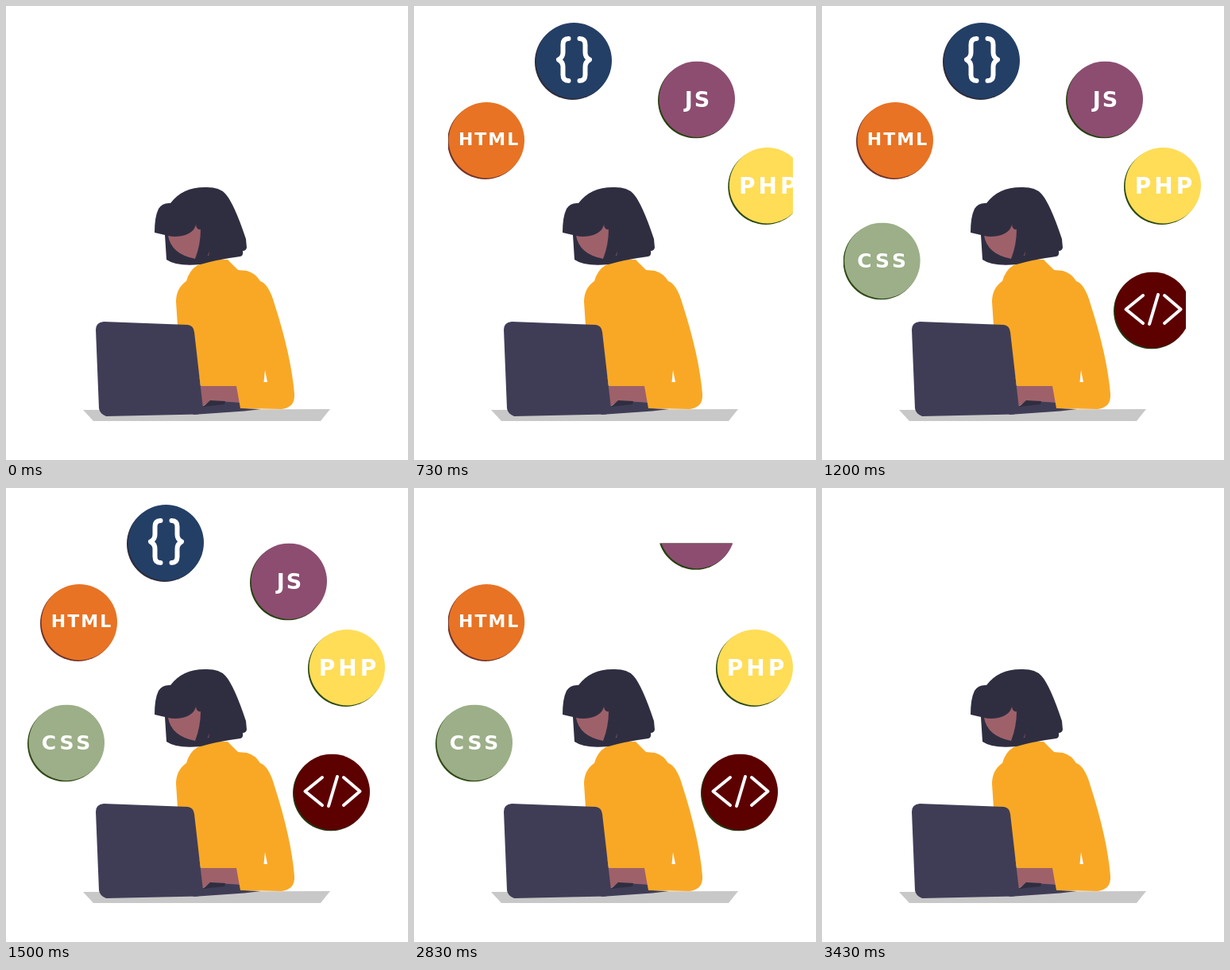
An HTML page with a canvas for the animation above (3.53 s loop, 506 by 571 pixels).

```html
<!DOCTYPE html>
<html lang="en">
<head>
<meta charset="utf-8">
<title>Coder at work</title>
<style>
  html, body { margin: 0; width: 100%; height: 100%; overflow: hidden; background: #fff; }
  canvas { display: block; }
</style>
</head>
<body>
<canvas id="stage" width="506" height="571"></canvas>
<script>
const ctx = document.getElementById('stage').getContext('2d');
const LOOP = 3530;
const BOX = 97;
const ENTER = { stagger: 200, duration: 500 };
const LEAVE = { firstEnd: 2704, stagger: 143, duration: 225 };
const HAIR = '#2f2e41', SKIN = '#9e616a', SHIRT = '#f9a826', LAPTOP = '#3f3d56';

function label(text, x, y, size, spacing) {
  return () => {
    ctx.font = `bold ${size}px "DejaVu Sans", sans-serif`;
    ctx.letterSpacing = spacing + 'px';
    ctx.textAlign = 'center';
    ctx.fillStyle = '#fff';
    ctx.fillText(text, x + spacing / 2, y + size * 0.365);
  };
}

function strokes(x, y, width, d) {
  const path = new Path2D(d);
  return () => {
    ctx.translate(x, y);
    ctx.lineWidth = width;
    ctx.lineCap = ctx.lineJoin = 'round';
    ctx.strokeStyle = '#fff';
    ctx.stroke(path);
  };
}

const braces = strokes(49.5, 46.5, 6,
  'M-7-26.5Q-14-26.5-14-19V-9Q-14-3-19.5 0Q-14 3-14 9V19Q-14 26.5-7 26.5' +
  'M7-26.5Q14-26.5 14-19V-9Q14-3 19.5 0Q14 3 14 9V19Q14 26.5 7 26.5');
const tag = strokes(50, 47, 4, 'M-13-17.5L-34.5 0L-13 17.5M6-18.5L-5 18.5M14-17.5L34.5 0L14 17.5');

// dx, dy: the side from which each coin slides into its box
const coins = [
  { x: 152, y: 21, dx: 0, dy: -1, face: '#243f66', edge: '#2d2a39', mark: braces },
  { x: 307, y: 69.5, dx: 0, dy: -1, face: '#8c4d71', edge: '#26400f', mark: label('JS', 49.5, 47.5, 27, 2) },
  { x: 43, y: 121, dx: -1, dy: 0, face: '#e87324', edge: '#70322a', mark: label('HTML', 51.5, 46, 22, 2) },
  { x: 380, y: 178, dx: 1, dy: 0, face: '#ffdd57', edge: '#2b4812', mark: label('PHP', 50, 48, 28, 4) },
  { x: 27, y: 272.5, dx: -1, dy: 0, face: '#9caf88', edge: '#2d4814', mark: label('CSS', 48.5, 47, 25, 4) },
  { x: 361, y: 334.5, dx: 1, dy: 0, face: '#5c0000', edge: '#26330c', mark: tag }
];

const figure = [
  ['#c8c8c8', 'M97 508L408 507L396 522H110Z'],
  [LAPTOP, 'M235 514L247 503L276 497L296 498L300 506L321 507L300 509.5Z'],
  [SKIN, 'M243 477H292L295 499L276 497.5L257 497L247 504Z'],
  [HAIR, 'M248 504L257 496L276 497L275 501Z'],
  [SHIRT, 'M241 326Q231 332 227 346Q214 355 214 372L216 402L236 420L245 478H290L295 506L347 507' +
    'Q364 505 363 488Q359 440 338 375Q331 350 320 346Q314 336 303 333L292 332L279 319L262 319Z'],
  ['#fff', 'M326 458L324.5 473H329Z'],
  [HAIR, 'M207 248Q222 228 250 228Q268 227 276 236Q287 248 302 293L303 304Q302 308 298 308' +
    'Q299 314 295 315Q265 319 245 325Q215 328 202 319L200 288L187 285Q187 265 192 255Q197 247 207 248Z'],
  [SKIN, 'M204 289Q208 312 238 318Q245 300 245 281Q240 282 239 275Q237 285 222 289Q212 291 204 289Z'],
  [SKIN, 'M256 308.5L254 314L255 314Z'],
  [LAPTOP, 'M123 397L229 401Q236 402 237 410L248 506Q248 513 241 513.5L126 516Q118 513 117 506' +
    'L113 407Q113 398 123 397Z']
].map(([color, d]) => [color, new Path2D(d)]);

function offset(time, i) {
  const entered = (time - i * ENTER.stagger) / ENTER.duration;
  const left = (time - LEAVE.firstEnd - i * LEAVE.stagger) / LEAVE.duration;
  if (entered <= 0 || left >= 0) return 1;
  if (entered < 1) return 2 ** (-10 * entered);
  return left > -1 ? 2 ** (10 * left) : 0;
}

function disc(x, y, color) {
  ctx.fillStyle = color;
  ctx.beginPath();
  ctx.arc(x, y, 47.7, 0, Math.PI * 2);
  ctx.fill();
}

function drawCoin(coin, shift) {
  if (shift >= 1) return;
  ctx.save();
  ctx.beginPath();
  ctx.rect(coin.x, coin.y, BOX, BOX);
  ctx.clip();
  ctx.translate(coin.x + coin.dx * shift * BOX, coin.y + coin.dy * shift * BOX);
  disc(47.7, 49.3, coin.edge);
  disc(49.3, 47.7, coin.face);
  coin.mark();
  ctx.restore();
}

function draw(time) {
  ctx.fillStyle = '#fff';
  ctx.fillRect(0, 0, 506, 571);
  for (const [color, path] of figure) {
    ctx.fillStyle = color;
    ctx.fill(path);
  }
  coins.forEach((coin, i) => drawCoin(coin, offset(time, i)));
}

const start = performance.now();
function tick() {
  const elapsed = (performance.now() - start) % LOOP;
  // the motion runs in 30 steps per second
  draw(Math.floor(elapsed * 0.03 + 0.21) * 100 / 3);
  requestAnimationFrame(tick);
}
tick();
</script>
</body>
</html>
```
